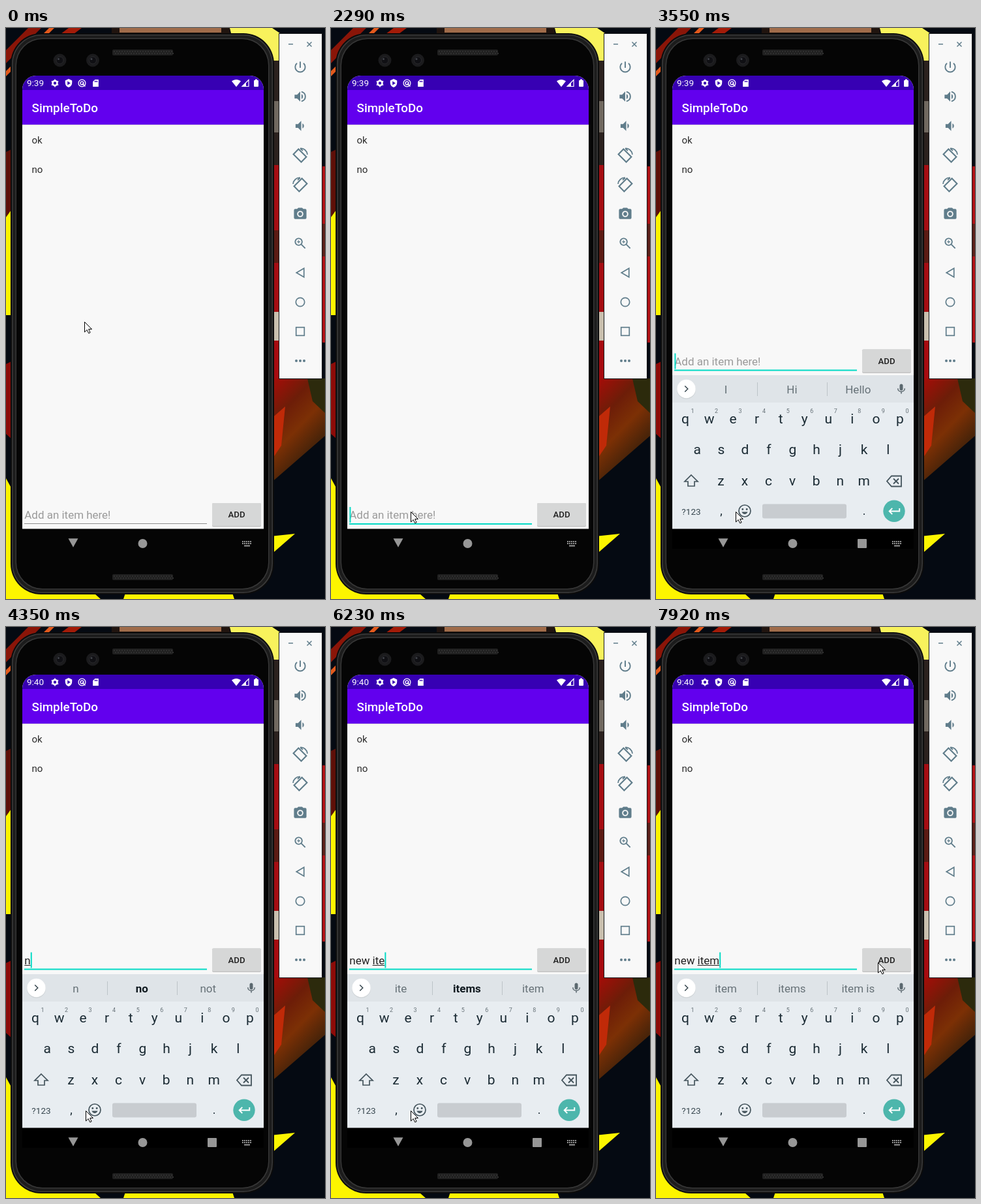
An HTML page with a canvas that plays this animation: 489x875 px, repeating every 8 s.

```html
<!DOCTYPE html>
<html lang="en">
<head>
<meta charset="utf-8">
<title>SimpleToDo</title>
<style>
html, body { margin: 0; width: 489px; height: 875px; overflow: hidden; background: #000; }
canvas { display: block; }
</style>
</head>
<body>
<canvas id="stage" width="489" height="875"></canvas>
<script>
const ctx = document.getElementById('stage').getContext('2d');
const LOOP = 8000;
const SLATE = '#607d8b', ACCENT = '#03dac5', KEY = '#1b2b34';

// Each entry holds from its time until the next one.
const cursorSteps = [
  [0, [120, 450]], [280, [153, 476]], [400, [260, 555]], [520, [289, 577]],
  [1430, [182, 741]], [1580, [163, 755]], [1860, [124, 741]], [2010, [122, 741]],
  [7440, [200, 640]], [7560, [300, 520]], [7680, [352, 449]], [7800, [383, 481]], [7920, [340, 514]]
];
const caretSteps = [
  [0, false], [2290, true], [2880, false], [3400, true], [3800, false],
  [4350, true], [7190, false], [7680, true]
];
const typingSteps = [
  [0, ['', 'I', 'Hi', 'Hello']],
  [4350, ['n', 'n', '*no', 'not']],
  [4750, ['ne', 'ne', '*new', 'next']],
  [5030, ['new', 'new', 'New', 'news']],
  [5300, ['new ', 'phone', 'one', 'job']],
  [5700, ['new i', 'i', '*I', 'in']],
  [5980, ['new it', 'it', "it's", 'its']],
  [6230, ['new ite', 'ite', '*items', 'item']],
  [6630, ['new item', 'item', 'items', 'item is']]
];
const backAngles = [[0, 0], [2880, 90], [3280, 45], [3400, 0]];

const at = (steps, t) => steps.findLast(s => s[0] <= t)[1];

function rect(x, y, w, h, color, r = 0) {
  ctx.fillStyle = color;
  ctx.beginPath();
  ctx.roundRect(x, y, w, h, r);
  ctx.fill();
}

function circle(x, y, r, fill, stroke, width = 1.8) {
  ctx.beginPath();
  ctx.arc(x, y, r, 0, Math.PI * 2);
  if (fill) { ctx.fillStyle = fill; ctx.fill(); }
  if (stroke) { ctx.strokeStyle = stroke; ctx.lineWidth = width; ctx.stroke(); }
}

function poly(color, ...pts) {
  ctx.fillStyle = color;
  ctx.beginPath();
  for (let i = 0; i < pts.length; i += 2) ctx.lineTo(pts[i], pts[i + 1]);
  ctx.closePath();
  ctx.fill();
}

function text(str, x, y, size, color, weight = 400, align = 'left') {
  ctx.font = `${weight} ${size}px Roboto, sans-serif`;
  ctx.textAlign = align;
  ctx.fillStyle = color;
  ctx.fillText(str, x, y);
}

// Draws a path laid out on a 24-unit grid, centred on x, y.
function icon(x, y, size, d, { fill, stroke, width = 2, angle = 0 } = {}) {
  ctx.save();
  ctx.translate(x, y);
  ctx.rotate(angle * Math.PI / 180);
  ctx.scale(size / 24, size / 24);
  ctx.translate(-12, -12);
  const path = new Path2D(d);
  if (fill) { ctx.fillStyle = fill; ctx.fill(path, 'evenodd'); }
  if (stroke) { ctx.strokeStyle = stroke; ctx.lineWidth = width; ctx.stroke(path); }
  ctx.restore();
}

function drawWallpaper() {
  rect(0, 0, 489, 875, '#050a12');
  poly('#8a1508', 34, 0, 54, 0, 0, 54, 0, 34);
  poly('#e2591c', 66, 0, 74, 0, 0, 74, 0, 66);
  poly('#a31b08', 96, 0, 116, 0, 100, 12, 80, 12);
  poly('#5e0f08', 0, 190, 20, 180, 20, 262, 0, 290);
  poly('#fdf500', 0, 290, 20, 262, 20, 440, 0, 440);
  poly('#8c0b08', 0, 515, 20, 505, 20, 640, 0, 622);
  poly('#fdf500', 0, 690, 60, 800, 145, 875, 0, 875);
  poly('#fdf500', 185, 860, 345, 860, 350, 875, 180, 875);
  rect(162, 0, 181, 12, '#20140f');
  rect(174, 0, 156, 7, '#a06c4a');
  poly('#f8f25c', 343, 0, 408, 0, 420, 8, 420, 50, 400, 50, 380, 12, 346, 12);
  rect(408, 50, 12, 165, '#2b211e');
  rect(408, 112, 12, 48, '#70685f');
  rect(408, 210, 12, 225, '#a40d12');
  rect(408, 310, 12, 50, '#5b1b13');
  rect(408, 435, 12, 44, '#c9bfae');
  rect(408, 479, 12, 65, '#a60b10');
  rect(484, 212, 5, 270, '#ae1115');
  rect(484, 300, 5, 50, '#59201a');
  const ember = ctx.createLinearGradient(405, 540, 489, 620);
  ember.addColorStop(0, '#a80c08');
  ember.addColorStop(.4, '#6d1d08');
  ember.addColorStop(.7, '#7c3005');
  ember.addColorStop(1, '#4a2409');
  poly(ember, 405, 537, 489, 537, 489, 625, 405, 698);
  poly('#2c2a0c', 462, 537, 489, 537, 489, 590, 470, 572);
  poly('#c02a08', 405, 600, 428, 580, 422, 640, 405, 665);
  poly('#fdf500', 405, 779, 443, 775, 405, 808);
}

function drawPhone() {
  rect(7, 8, 404, 860, '#0c0c0c', 47);
  rect(9, 10, 400, 856, '#3a3a3a', 45);
  rect(10.5, 11.5, 397, 853, '#1c1c1c', 44);
  rect(14.5, 15.5, 389, 845, '#363636', 41);
  rect(16, 17, 386, 842, '#050505', 40);
  for (const x of [82.5, 133]) {
    circle(x, 49.5, 10, '#1b1b1d');
    circle(x, 49.5, 5.5, '#101014', '#2a2a2d', 1);
    circle(x - 2, 47.5, 1.5, '#41444a');
  }
  for (const y of [33, 837]) {
    rect(163, y, 93, 9, '#202020', 2);
    for (let x = 165; x < 255; x += 4) {
      rect(x, y + 2, 2, 2, '#303030');
      rect(x + 2, y + 5, 2, 2, '#303030');
    }
  }
}

function drawAppBar(t) {
  rect(25, 73, 370, 695, '#f8f8f8', [21, 21, 0, 0]);
  rect(25, 73, 370, 22.5, '#3700b3', [21, 21, 0, 0]);
  rect(25, 95, 370, 53, '#6200ee');
  rect(25, 148, 370, 1, '#d8d6dc');
  text(t < 3950 ? '9:39' : '9:40', 32, 89, 13.5, '#fff');
  // Gear
  circle(75, 84.5, 3.5, null, '#fff', 2.6);
  for (let a = 0; a < 6; a++) icon(75, 84.5, 13, 'M10.5 1h3v4h-3z', { fill: '#fff', angle: a * 60 });
  icon(96, 84.5, 14, 'M12 1L3 5v6c0 6 4 10 9 12 5-2 9-6 9-12V5zM9 7v10l8-5z', { fill: '#fff' });
  circle(116.5, 84.5, 5.4, null, '#fff', 1.3);
  circle(116.5, 84.5, 2.4, null, '#fff', 1.4);
  icon(117, 85, 12, 'M12 12L21 21', { stroke: '#fff', width: 3 });
  icon(137.5, 84.5, 13, 'M10 2H20V22H4V8zM9 5v4h2V5zm3 0v4h2V5zm3 0v4h2V5z', { fill: '#fff' });
  icon(353, 84.5, 14, 'M12 22L0 7C7 1 17 1 24 7z', { fill: '#fff' });
  icon(367, 84.5, 12, 'M2 22L22 2V22z', { stroke: '#fff', width: 2.4 });
  icon(367, 84.5, 12, 'M2 22L14 10V22z', { fill: '#fff' });
  rect(380, 80, 7, 10, '#fff', 1);
  rect(382, 78.5, 3, 2, '#fff');
  text('SimpleToDo', 39.5, 129, 18.85, '#fff', 500);
  text('ok', 39.5, 176.5, 15.1, '#2c2c2c');
  text('no', 39.5, 221.5, 15.1, '#2c2c2c');
}

function drawInput(t, typed) {
  const top = t < 2880 ? 728 : 492.5;
  rect(316, top, 75, 36.5, '#c4c4c4', 2);
  rect(316, top, 75, 35, '#d6d7d7', 2);
  text('ADD', 353.5, top + 22, 13.2, '#212121', 500, 'center');
  if (t < 2290) rect(28, 759, 280, 1, '#8d8d8d');
  else rect(28, top + 31, 280, 2, ACCENT);

  const base = top + 24;
  if (!typed) text('Add an item here!', 28.3, base, 16.97, '#9a9a9a');
  else text(typed, 28.3, base, 16.97, '#222');
  const wordStart = typed.lastIndexOf(' ') + 1;
  const lead = ctx.measureText(typed.slice(0, wordStart)).width;
  const full = ctx.measureText(typed).width;
  if (full > lead) rect(28.3 + lead, base + 1.5, full - lead, 1, '#222');
  if (at(caretSteps, t)) rect(28.4 + full, top + 6, 2, 24, ACCENT);
}

function drawKeyRow(keys, x, y) {
  [...keys].forEach((k, i) => text(k, x + i * 36.55, y, 21, KEY, 400, 'center'));
}

function drawKeyboard(words) {
  rect(25, 532, 370, 236, '#e8edf1');
  rect(25, 532, 370, 42, '#dfe4e8');
  circle(46.5, 554, 14.5, '#cfd4d7');
  circle(46.5, 553, 14.2, '#fff');
  icon(46.5, 553, 18, 'M9 6L15 12L9 18', { stroke: '#37474f' });
  rect(155, 543, 1, 21, '#bcc3c8');
  rect(262, 543, 1, 21, '#bcc3c8');
  words.forEach((word, i) => {
    const strong = word[0] === '*';
    text(strong ? word.slice(1) : word, 107 + i * 101.4, 560, 17,
      strong ? '#101a20' : '#667177', strong ? 700 : 400, 'center');
  });
  rect(373.5, 545.5, 5, 10, '#5b686f', 2.5);
  icon(376, 553, 18, 'M5 11C5 20 19 20 19 11M12 18V22', { stroke: '#5b686f' });

  drawKeyRow('qwertyuiop', 45, 605.5);
  [...'1234567890'].forEach((n, i) => text(n, 56 + i * 36.55, 590, 9, '#667177', 400, 'center'));
  drawKeyRow('asdfghjkl', 63.3, 653);
  drawKeyRow('zxcvbnm', 99.5, 700.5);
  icon(54, 694, 24, 'M12 3L22 13H17V20H7V13H2z', { stroke: '#44545c', width: 1.7 });
  icon(365, 694.5, 24, 'M8 4H23V20H8L1 12zM11 8L19 16M19 8L11 16', { stroke: '#44545c', width: 1.8 });
  text('?123', 54, 745.5, 13.6, '#37474f', 400, 'center');
  text(',', 100, 746, 18, KEY, 400, 'center');
  text('.', 319, 746, 18, KEY, 400, 'center');
  circle(136, 740, 9, null, '#44545c', 1.7);
  circle(132.8, 737.5, 1.4, '#44545c');
  circle(139.2, 737.5, 1.4, '#44545c');
  icon(136, 740, 24, 'M7.5 13.5C9 18 15 18 16.5 13.5z', { fill: '#44545c' });
  rect(163, 729.5, 129, 22, '#c8ccd0', 3);
  circle(365, 740.3, 16.7, '#4db6ac');
  icon(365, 740.5, 22, 'M21 7V12H4M9 7L4 12L9 17', { stroke: '#fff', width: 2.1 });
}

function drawNavBar(t) {
  const gray = '#979797';
  const keyboardMode = t >= 2880;
  rect(25, 767.5, 370, 30.5, keyboardMode ? '#000' : '#050505');
  icon(103, 789, 18, 'M2 3H22L12 21z', { fill: gray, angle: at(backAngles, t) });
  circle(209.5, 790, 7, gray);
  if (keyboardMode) rect(309, 783, 14, 14, gray, 1);
  for (let y = 786; y < 792; y += 3)
    for (let x = 362; x < 377; x += 3) rect(x, y, 2, 2, gray);
  rect(365, 792.5, 9, 2, gray);
}

function drawToolPanel() {
  rect(418, 8, 67, 530, '#17191b');
  rect(419, 9, 65, 528, '#f8f8f8');
  const solid = { fill: SLATE }, line = { stroke: SLATE };
  const x = 451, size = 23;
  rect(433, 24, 7, 1.5, SLATE);
  icon(465, 25, 12, 'M5 5L19 19M19 5L5 19', { stroke: SLATE, width: 3 });
  icon(x, 60, size, 'M12 3V13M17.2 5.8A8 8 0 1 1 6.8 5.8', line);
  const speaker = 'M3 9v6h4l5 5V4L7 9z';
  const wave = 'M14 8C17.3 9.5 17.3 14.5 14 16z';
  icon(x, 105, size, speaker + wave, solid);
  icon(x, 105, size, 'M14 4.3C22.3 6.5 22.3 17.5 14 19.7', line);
  icon(x + 1.5, 150, size, speaker + wave, solid);
  for (const [y, side] of [[195, 1], [240, -1]]) {
    ctx.save();
    ctx.translate(x, y);
    ctx.scale(side, 1);
    icon(-0.5, 0.5, 24, 'M6.5 3.5H17.5V20.5H6.5z', { stroke: SLATE, width: 2.1, angle: -45 });
    icon(0, 0, 24, 'M12 1.5C18 1 22.5 5.5 23 11M12 1.5L16 5', { stroke: SLATE, width: 1.7 });
    ctx.restore();
  }
  icon(x, 285, size, 'M9 2L7 4H4Q2 4 2 6V18Q2 20 4 20H20Q22 20 22 18V6Q22 4 20 4H17L15 2z'
    + 'M7 12a5 5 0 1 0 10 0a5 5 0 1 0-10 0z', solid);
  circle(x, 285, 2.9, SLATE);
  icon(x, 330, size, 'M4 9.5a5.5 5.5 0 1 0 11 0a5.5 5.5 0 1 0-11 0M14 14L20 20', line);
  icon(x, 330, size, 'M9.5 7V12M7 9.5H12', { stroke: SLATE, width: 1.2 });
  icon(x, 375, size, 'M18 5V19L6 12z', { stroke: SLATE, width: 1.8 });
  circle(x, 420, 6.7, null, SLATE, 1.7);
  ctx.lineWidth = 1.7;
  ctx.strokeRect(444.7, 458.7, 12.6, 12.6);
  for (const dx of [-6, 0, 6]) circle(x + dx, 510, 2, SLATE);
}

function drawCursor([x, y]) {
  ctx.save();
  ctx.translate(x + .5, y + .5);
  const arrow = new Path2D('M0 0V15.5L3.7 12L6.2 17.3L8.6 16.3L6.2 11H11z');
  ctx.fillStyle = '#fff';
  ctx.fill(arrow);
  ctx.strokeStyle = '#000';
  ctx.lineWidth = 1;
  ctx.stroke(arrow);
  ctx.restore();
}

function draw(t) {
  const [typed, ...words] = at(typingSteps, t);
  drawWallpaper();
  drawPhone();
  drawAppBar(t);
  drawInput(t, typed);
  if (t >= 3550) drawKeyboard(words);
  drawNavBar(t);
  drawToolPanel();
  drawCursor(at(cursorSteps, t));
}

const start = performance.now();
function tick() {
  draw((performance.now() - start) % LOOP);
  requestAnimationFrame(tick);
}
tick();
</script>
</body>
</html>
```
